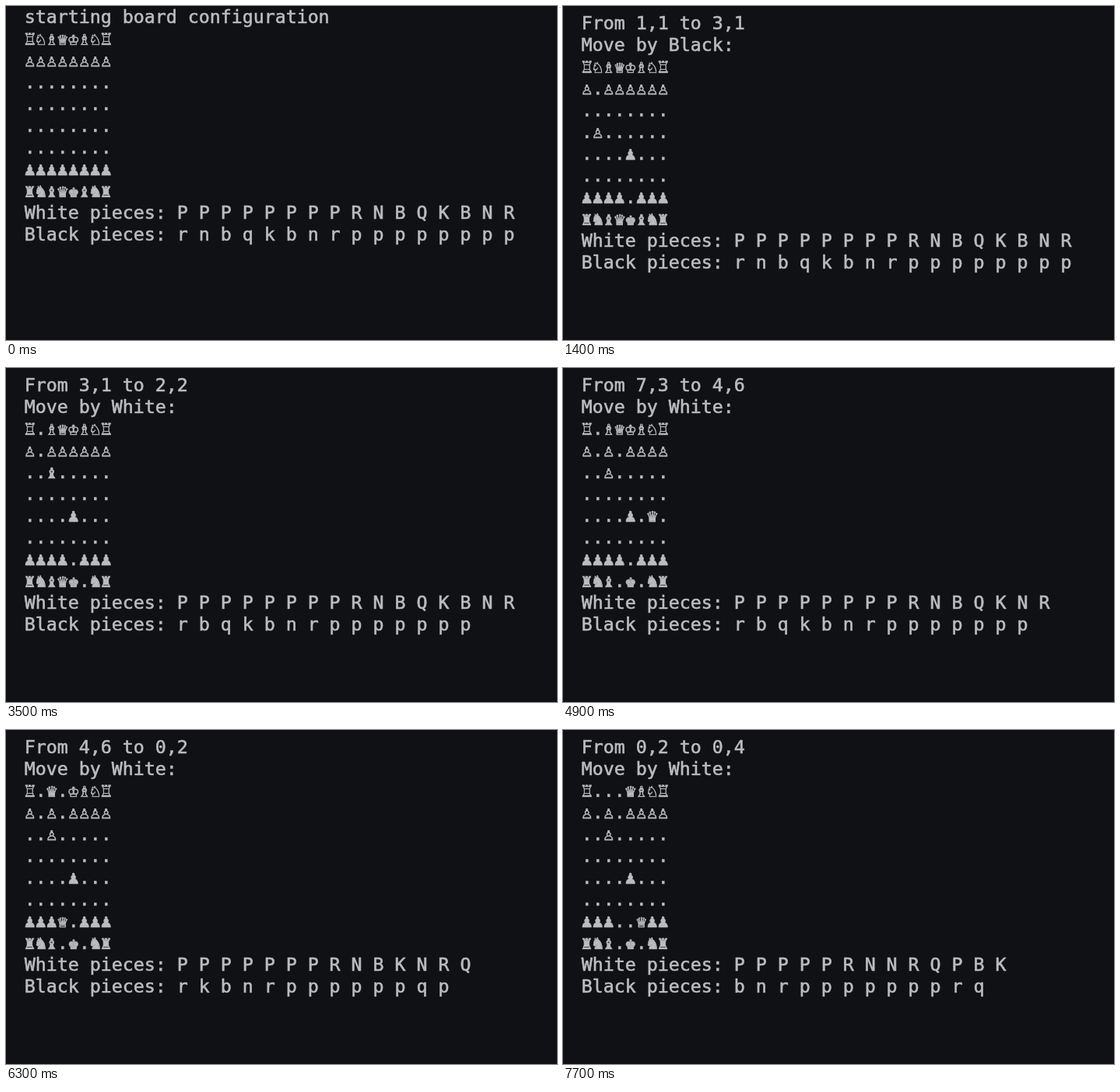
An HTML page for the animation above (8000 ms loop, 708 px wide and 430 px high).

```html
<!DOCTYPE html>
<html lang="en">
<head>
<meta charset="utf-8">
<style>
  html, body { margin: 0; height: 100%; overflow: hidden; background: #101114; }
  svg { display: block; width: 708px; height: 430px; }
  text {
    font: 23.25px "DejaVu Sans Mono", monospace;
    fill: #bbbcbe;
    stroke: #bbbcbe;
    stroke-width: .6px;
    white-space: pre;
  }
</style>
</head>
<body>
<svg viewBox="0 0 708 430"></svg>
<script>
const STEP = 700, LOOP = 8000, LINE = 28;
const START = ["♖♘♗♕♔♗♘♖", "♙♙♙♙♙♙♙♙", "........", "........",
               "........", "........", "♟♟♟♟♟♟♟♟", "♜♞♝♛♚♝♞♜"];

// Each move: from row, from column, to row, to column
const MOVES = ["6444", "1131", "7531", "0122", "3122", "1322",
               "7346", "0363", "4602", "6365", "0204"];

// Piece lists, keyed by the step at which they take effect
const WHITE = { 0: "PPPPPPPPRNBQKBNR", 6: "PPPPPPPPRNBQKNR",
                8: "PPPPPPPRNBKNRQ", 10: "PPPPPRNNRQPBK" };
const BLACK = { 0: "rnbqkbnrpppppppp", 3: "rnbqkbnrppppppp", 5: "rbqkbnrppppppp",
                9: "rkbnrppppppqp", 11: "bnrppppppprq" };

const screens = [];
const board = START.map(row => [...row]);
let white, black;
for (let step = 0; step <= MOVES.length; step++) {
  let head = ["starting board configuration"];
  if (step) {
    const [r, c, toR, toC] = MOVES[step - 1];
    board[toR][toC] = board[r][c];
    board[r][c] = ".";
    head = [`From ${r},${c} to ${toR},${toC}`, `Move by ${step % 2 ? "White" : "Black"}:`];
  }
  white = WHITE[step] || white;
  black = BLACK[step] || black;
  screens.push([...head, ...board.map(row => row.join("")),
    "White pieces: " + [...white].join(" "),
    "Black pieces: " + [...black].join(" ")]);
}

const svg = document.querySelector("svg");
const lines = Array.from({ length: 12 }, () => {
  const line = document.createElementNS(svg.namespaceURI, "text");
  line.setAttribute("x", 23.7);
  return svg.appendChild(line);
});

let shown = -1;
function draw() {
  const step = Math.floor(performance.now() % LOOP / STEP);
  if (step !== shown) {
    shown = step;
    lines.forEach((line, i) => {
      line.setAttribute("y", (step ? 30 : 22) + i * LINE);
      line.textContent = screens[step][i] || "";
    });
  }
  requestAnimationFrame(draw);
}
draw();
</script>
</body>
</html>
```
